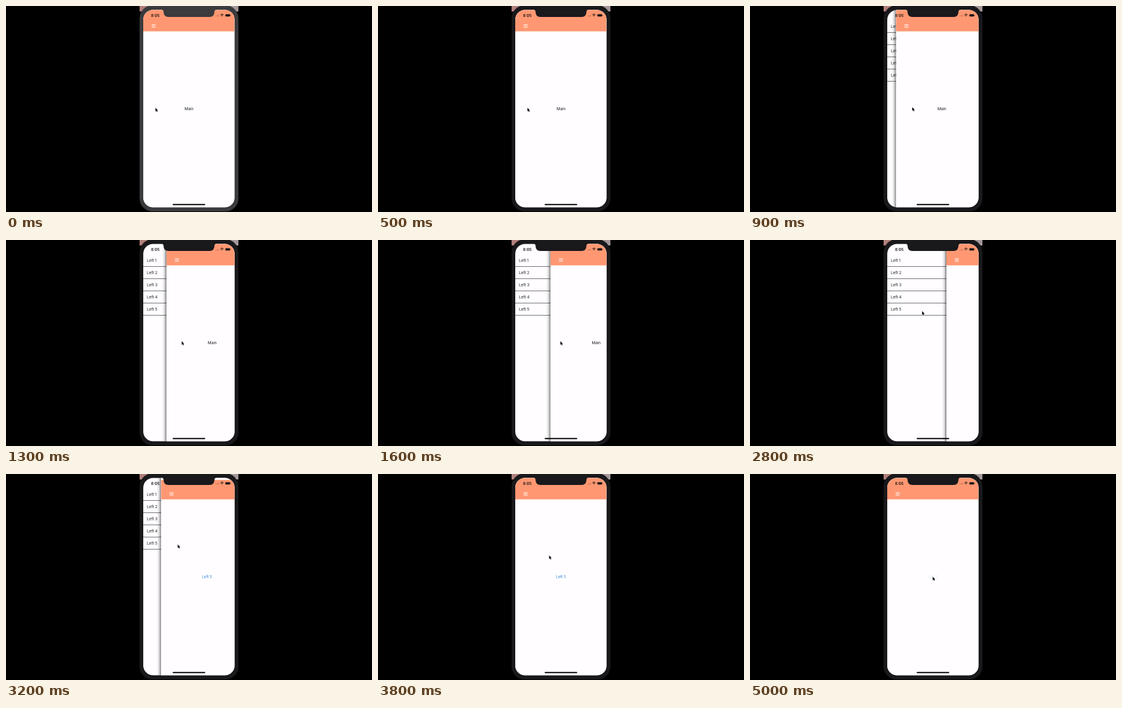
Write an HTML page with a canvas that moves like this. It is 600x338 px and loops after 5100 ms.

```html
<!DOCTYPE html>
<html lang="en">
<head>
<meta charset="utf-8">
<title>Drawer navigation</title>
<style>
html, body { margin: 0; width: 100%; height: 100%; overflow: hidden; background: #000; }
canvas { display: block; width: 600px; height: 338px; }
</style>
</head>
<body>
<canvas id="stage"></canvas>
<script>
const LOOP = 5100, STEP = 100;
const SCREEN = { x: 225, y: 6.5, w: 149.7, h: 323.7, r: 16 };
const WHITE = '#fffdff', ORANGE = '#ff9872', INK = '#1c1c1e', BLUE = '#2f86d8';
const FONT = 'Inter, "Liberation Sans", sans-serif';

const canvas = document.getElementById('stage');
const ctx = canvas.getContext('2d');
const dpr = window.devicePixelRatio || 1;
canvas.width = 600 * dpr;
canvas.height = 338 * dpr;
ctx.scale(dpr, dpr);

// Each key is [time, ...values].
const POINTER = [
  [0, 245, 167], [500, 245, 167], [900, 266, 166], [1500, 299, 166],
  [1650, 299, 166], [2000, 285, 127], [2200, 283, 118.5], [3200, 281.5, 115.5],
  [3500, 281.5, 116], [3800, 280.5, 133.5], [4400, 298, 162],
  [4700, 301, 171], [5000, 299.5, 168.5], [LOOP, 299.5, 168.5]
];
const ROW_FADE = [[0, 1], [2300, 1], [2450, 0.3], [2600, 1], [LOOP, 1]];
const LINK_FADE = [[0, 1], [4700, 1], [5000, 0.14], [LOOP, 0.14]];

function sample(keys, t) {
  const i = Math.max(1, keys.findIndex(k => k[0] >= t));
  const [a, b] = [keys[i - 1], keys[i]];
  const p = (t - a[0]) / (b[0] - a[0]);
  return a.slice(1).map((v, n) => v + (b[n + 1] - v) * p);
}

function ramp(t, from, to) {
  return Math.min(1, Math.max(0, (t - from) / (to - from)));
}

function smooth(p) {
  return p * p * (3 - 2 * p);
}

// The panel follows the drag, settles open, then closes after the choice.
function panelOffset(t) {
  const drag = 14.5 * ramp(t, 500, 900) + 32.5 * ramp(t, 900, 1450);
  const settle = 50 * smooth(ramp(t, 1450, 1950));
  return (drag + settle) * (1 - smooth(ramp(t, 2800, 3430)));
}

function rect(x, y, w, h, color) {
  ctx.fillStyle = color;
  ctx.fillRect(x, y, w, h);
}

function roundRect(x, y, w, h, r, color) {
  ctx.beginPath();
  ctx.roundRect(x, y, w, h, r);
  ctx.fillStyle = color;
  ctx.fill();
}

function label(text, x, y, { size = 6.4, weight = 400, color = INK, align = 'left', alpha = 1 } = {}) {
  ctx.save();
  ctx.globalAlpha = alpha;
  ctx.font = `${weight} ${size}px ${FONT}`;
  ctx.textAlign = align;
  ctx.textBaseline = 'alphabetic';
  ctx.fillStyle = color;
  ctx.fillText(text, x, y);
  ctx.restore();
}

function drawDrawer(t) {
  rect(SCREEN.x, 0, SCREEN.w, 338, WHITE);
  for (let i = 0; i < 5; i++) {
    const y = 33.8 + i * 20;
    const alpha = i === 4 ? sample(ROW_FADE, t)[0] : 1;
    label(`Left ${i + 1}`, 231, y + 2.3, { alpha });
    rect(SCREEN.x, y + 9.3, SCREEN.w, 0.8, '#505052');
  }
}

function drawPanel(t) {
  const dx = panelOffset(t);
  const left = SCREEN.x + dx;
  if (dx > 0) {
    const shade = ctx.createLinearGradient(left - 7, 0, left, 0);
    shade.addColorStop(0, 'rgba(0,0,0,0)');
    shade.addColorStop(0.5, 'rgba(0,0,0,0.13)');
    shade.addColorStop(1, 'rgba(0,0,0,0.5)');
    rect(left - 7, 0, 7, 338, shade);
  }
  rect(left, 0, SCREEN.w, 338, WHITE);
  const top = t >= 3000 && t < 3400 ? 9.7 : 0;
  rect(left, top, SCREEN.w, 41.6 - top, ORANGE);
  for (const y of [30.1, 32.3, 34.5]) rect(238.7 + dx, y, 6.6, 0.85, '#fff');
  if (t < 2700) {
    label('Main', 300 + dx, 170.7, { align: 'center' });
  } else {
    label('Left 5', 300 + dx, 170.5, {
      size: 6.1, color: BLUE, align: 'center', alpha: sample(LINK_FADE, t)[0]
    });
  }
}

function drawStatus() {
  label('8:05', 237.7, 17.8, { size: 6.3, weight: 600, color: '#151214' });
  for (let i = 0; i < 4; i++) {
    rect(343.2 + i * 1.6, 16 - i * 0.5, 1, 1.2 + i * 0.5, 'rgba(60,40,35,0.3)');
  }
  ctx.strokeStyle = '#151214';
  ctx.lineWidth = 1;
  for (const r of [1.9, 3.7]) {
    ctx.beginPath();
    ctx.arc(354, 17, r, Math.PI * 1.25, Math.PI * 1.75);
    ctx.stroke();
  }
  roundRect(353.4, 15.9, 1.2, 1.2, 0.6, '#151214');
  roundRect(359.6, 13.5, 7.8, 3.8, 1, '#151214');
  rect(367.8, 14.7, 0.5, 1.4, '#151214');
}

function drawNotch(color) {
  ctx.beginPath();
  ctx.moveTo(255.5, 6);
  ctx.quadraticCurveTo(258.3, 6.5, 258.3, 9.5);
  ctx.quadraticCurveTo(258.3, 18, 266.5, 18);
  ctx.lineTo(333.5, 18);
  ctx.quadraticCurveTo(341.7, 18, 341.7, 9.5);
  ctx.quadraticCurveTo(341.7, 6.5, 344.5, 6);
  ctx.closePath();
  ctx.fillStyle = color;
  ctx.fill();
}

function drawPointer(x, y) {
  const outline = [[0, 0], [0, 6], [1.4, 4.8], [2.4, 7], [3.4, 6.5], [2.5, 4.5], [4.2, 4.4]];
  ctx.beginPath();
  outline.forEach(([px, py]) => ctx.lineTo(x + px, y + py));
  ctx.closePath();
  ctx.lineJoin = 'round';
  ctx.lineWidth = 0.9;
  ctx.strokeStyle = '#fff';
  ctx.stroke();
  ctx.fillStyle = '#080808';
  ctx.fill();
}

function draw(t) {
  const bezel = t < 500 ? '#3b3a3d' : '#19181b';
  rect(0, 0, 600, 338, '#000');
  rect(219, 0, 20, 9, '#b17f7b');
  rect(361, 0, 20, 9, '#a49799');
  roundRect(219, -1, 162, 338, 21, bezel);

  ctx.save();
  ctx.beginPath();
  ctx.roundRect(SCREEN.x, SCREEN.y, SCREEN.w, SCREEN.h, SCREEN.r);
  ctx.clip();
  drawDrawer(t);
  drawPanel(t);
  drawStatus();
  roundRect(273.2, 324.7, 53.4, 2, 1, '#050505');
  ctx.restore();

  drawNotch(bezel);
  drawPointer(...sample(POINTER, t));
}

function tick() {
  const t = performance.now() % LOOP;
  draw(Math.floor(t / STEP) * STEP);
  requestAnimationFrame(tick);
}
tick();
</script>
</body>
</html>
```
